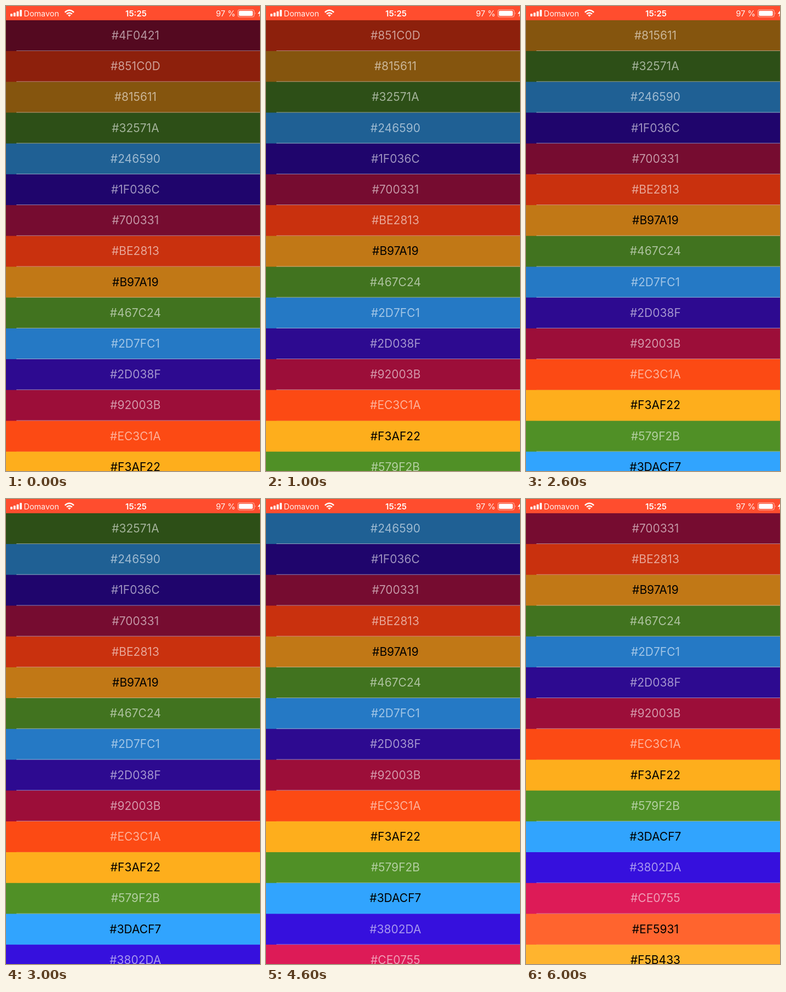
These frames come from a looping animation (464 px wide and 848 px high, 7 s). An HTML page:

```html
<!DOCTYPE html>
<html lang="en">
<head>
<meta charset="utf-8">
<title>Colour list</title>
<style>
  html, body { margin: 0; width: 100%; height: 100%; overflow: hidden; background: #ff4d2e; }
  svg { display: block; width: 464px; height: 848px; }
  text { font-family: Inter, Roboto, sans-serif; }
  .label { font-size: 21px; text-anchor: middle; }
  .status { font-size: 14.6px; fill: #fff; }
</style>
</head>
<body>
<svg viewBox="0 0 464 848" xmlns="http://www.w3.org/2000/svg">
  <g id="list"></g>
  <rect width="464" height="25.8" fill="#ff4d2e"/>
  <g fill="#fff">
    <rect x="8" y="14" width="3.8" height="5" rx="1"/>
    <rect x="13.7" y="12" width="3.8" height="7" rx="1"/>
    <rect x="19.4" y="9.8" width="3.8" height="9.2" rx="1"/>
    <rect x="25.1" y="7" width="3.8" height="12" rx="1"/>
  </g>
  <text class="status" x="32.5" y="18.6" style="font-size:14.4px" fill-opacity=".92">Domavon</text>
  <g fill="none" stroke="#fff" stroke-width="2.4">
    <path d="M107.6 11.6 Q115.8 4 124 11.6"/>
    <path d="M110.8 14.7 Q115.8 10.2 120.8 14.7"/>
    <path d="M113 16.6 Q115.8 14.4 118.6 16.6 L115.8 19.4Z" fill="#fff" stroke="none"/>
  </g>
  <text class="status" x="237.5" y="18.6" text-anchor="middle" style="font-size:15px;font-weight:600">15:25</text>
  <text class="status" x="419" y="18.6" text-anchor="end" fill-opacity=".94">97 %</text>
  <rect x="423.6" y="6.9" width="29.8" height="13" rx="3.4" fill="none" stroke="#fff" stroke-opacity=".5" stroke-width="1.2"/>
  <rect x="425.4" y="8.7" width="25.4" height="9.4" rx="1.8" fill="#fff"/>
  <path d="M454.8 11.2 Q457 13.4 454.8 15.6Z" fill="#fff" fill-opacity=".5"/>
  <path d="M465.5 6.5 L459.8 14.2 H463.5 L461.8 20.2 L467.5 12.2 H464Z" fill="#fff"/>
</svg>
<script>
const NS = "http://www.w3.org/2000/svg";
const TOP = 25.87, PITCH = 56.2, SHOWN = 15, STEP = 1000, STEPS = 7;

// label, shown colour, opacity of the separator below
const colours = [
  ["4F0421", "#540920", .5], ["851C0D", "#8d200c", .55], ["815611", "#85550e", .55],
  ["32571A", "#2d4f17", .6], ["246590", "#1f6094", .6], ["1F036C", "#1f056c", .6],
  ["700331", "#760c30", .6], ["BE2813", "#c9310e", .55], ["B97A19", "#c17816", .55],
  ["467C24", "#41731f", .6], ["2D7FC1", "#2579c5", .6], ["2D038F", "#2d0a90", .6],
  ["92003B", "#9c0e39", .6], ["EC3C1A", "#fc4a14", .1], ["F3AF22", "#feae1c", .05],
  ["579F2B", "#509026", .5], ["3DACF7", "#31a4fe", .05], ["3802DA", "#3610dd", .5],
  ["CE0755", "#dd1b57", .5], ["EF5931", "#ff642e", .15], ["F5B433", "#ffb42e", .1]
];
const darkText = ["B97A19", "F3AF22", "3DACF7", "EF5931", "F5B433"];
const list = document.getElementById("list");

function add(tag, attrs) {
  const el = document.createElementNS(NS, tag);
  for (const key in attrs) el.setAttribute(key, attrs[key]);
  return list.appendChild(el);
}

// Each band reaches the bottom and the next one covers it, so soft edges blend cleanly.
const at = i => TOP + i * PITCH;
const indices = [...Array(SHOWN).keys()];
const bands = indices.map(i => add("rect", { x: 0, y: at(i), width: 464, height: 848 - at(i) }));
const lines = indices.map(i => add("rect", { x: 19, y: at(i + 1) - 1, width: 445, height: 1, fill: "#dcd8dc" }));
const labels = indices.map(i => add("text", { class: "label", x: 236.4, y: at(i) + 35.1 }));

let current = -1;
function draw(ms) {
  const first = Math.floor(ms / STEP) % STEPS;
  if (first === current) return;
  current = first;
  for (const i of indices) {
    const [name, fill, opacity] = colours[first + i];
    const dark = darkText.includes(name);
    bands[i].setAttribute("fill", fill);
    lines[i].setAttribute("fill-opacity", opacity);
    labels[i].textContent = "#" + name;
    labels[i].setAttribute("fill", dark ? "#000" : "#fff");
    labels[i].setAttribute("fill-opacity", dark ? 1 : .57);
  }
}

const start = performance.now();
function tick() {
  draw(performance.now() - start);
  requestAnimationFrame(tick);
}
tick();
</script>
</body>
</html>
```
